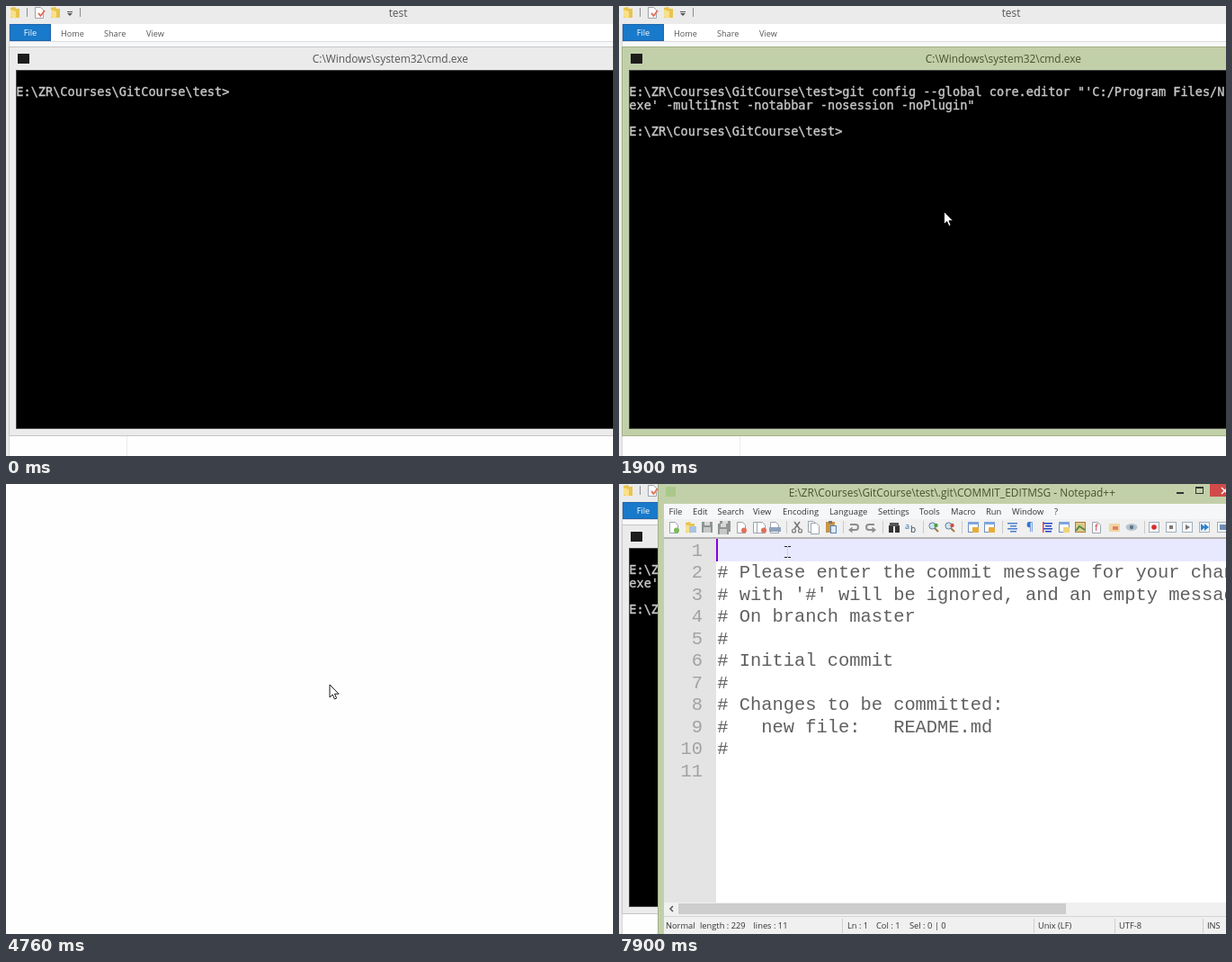
Animation of 675x500 px, one loop 8000 ms. Source, as an HTML page with a canvas:

```html
<!DOCTYPE html>
<html lang="en">
<head>
<meta charset="utf-8">
<title>Commit from the console</title>
<style>
html, body { margin: 0; width: 100%; height: 100%; overflow: hidden; background: #fff; }
canvas { display: block; width: 675px; height: 500px; }
</style>
</head>
<body>
<canvas id="stage" width="675" height="500"></canvas>
<script>
const ctx = document.getElementById('stage').getContext('2d');
const LOOP = 8000;
const UI = '"Open Sans", "Noto Sans", sans-serif';
const CONSOLE = '"DejaVu Sans Mono", monospace';
const CODE = '"Liberation Mono", monospace';
const GREEN = '#c2d0a9', GREY = '#ebebeb', INK = '#c6c6c6';
const PROMPT = 'E:\\ZR\\Courses\\GitCourse\\test>';
const CELL = 8.18;
const TITLE = 11.88;

function rect(x, y, w, h, fill) {
  ctx.fillStyle = fill;
  ctx.fillRect(x, y, w, h);
}

function frame(x, y, w, h, stroke) {
  ctx.strokeStyle = stroke;
  ctx.lineWidth = 1;
  ctx.strokeRect(x + .5, y + .5, w - 1, h - 1);
}

function text(str, x, y, size, fill, font = UI, align = 'left') {
  ctx.font = `${size}px ${font}`;
  ctx.textAlign = align;
  ctx.fillStyle = fill;
  ctx.fillText(str, x, y);
}

function poly(points, fill, stroke, width = 1) {
  ctx.beginPath();
  points.forEach(([x, y], i) => i ? ctx.lineTo(x, y) : ctx.moveTo(x, y));
  if (fill) { ctx.closePath(); ctx.fillStyle = fill; ctx.fill(); }
  if (stroke) { ctx.strokeStyle = stroke; ctx.lineWidth = width; ctx.stroke(); }
}

function arc(x, y, r, stroke, width, from = 0, to = 7) {
  ctx.beginPath();
  ctx.arc(x, y, r, from, to);
  ctx.strokeStyle = stroke;
  ctx.lineWidth = width;
  ctx.stroke();
}

function disc(x, y, r, fill) {
  ctx.beginPath();
  ctx.arc(x, y, r, 0, 7);
  ctx.fillStyle = fill;
  ctx.fill();
}

// Position along [time, x, y] stops, advanced in small hops like a screen capture
function along(stops, t, hop) {
  const first = stops[0][0], last = stops[stops.length - 1];
  const s = first + Math.floor((t - first) / hop + .01) * hop;
  if (t >= last[0]) return [last[1], last[2]];
  if (s <= first) return [stops[0][1], stops[0][2]];
  const i = stops.findIndex(k => k[0] > s);
  const [t0, x0, y0] = stops[i - 1], [t1, x1, y1] = stops[i];
  const u = (s - t0) / (t1 - t0), e = u * u * (3 - 2 * u);
  return [Math.round(x0 + (x1 - x0) * e), Math.round(y0 + (y1 - y0) * e)];
}

// ---- small icons ----

function doc(x, y, accent) {
  poly([[x + 1.5, y + .5], [x + 7.5, y + .5], [x + 10.5, y + 3.5], [x + 10.5, y + 12.5], [x + 1.5, y + 12.5], [x + 1.5, y + .5]], '#fff', '#9aa3ad');
  if (accent) disc(x + 9, y + 9.5, 3, accent);
}

function folder(x, y) {
  poly([[x, y + 1], [x + 5, y], [x + 6, y + 2], [x + 10, y + 2], [x + 10, y + 12], [x, y + 12]], '#e9c44d');
  poly([[x, y + 3], [x + 6, y + 5], [x + 6, y + 13], [x, y + 11]], '#f8e08c');
}

function disk(x, y) {
  rect(x, y, 12, 12, '#8f9494');
  rect(x + 3, y, 6, 4, '#d8d8d8');
  rect(x + 2, y + 6, 8, 6, '#c8c8c8');
}

function lens(x, y, mark) {
  poly([[x + 7, y + 7], [x + 11, y + 11]], null, '#a07a40', 2);
  disc(x + 4.5, y + 4.5, 3.6, '#cfe3f2');
  arc(x + 4.5, y + 4.5, 3.6, '#5d7f9c', 1);
  disc(x + 8.5, y + 4, 2.2, mark);
}

function hook(x, y, dir) {
  ctx.save();
  ctx.translate(x + 6, y + 6);
  ctx.scale(dir, 1);
  poly([[-4, -3], [2, -3]], null, '#8d8d8d', 2);
  arc(2, 0, 3, '#8d8d8d', 2, -Math.PI / 2, Math.PI / 2);
  poly([[2, 3], [-2, 3]], null, '#8d8d8d', 2);
  poly([[-6, 3], [-1.5, -.5], [-1.5, 6.5]], '#8d8d8d');
  ctx.restore();
}

function panel(x, y, mark) {
  rect(x, y, 12, 12, '#fff');
  frame(x, y, 12, 12, '#6d8fc0');
  rect(x, y, 12, 3, '#7fa5dc');
  rect(x + 5, y + 6, 7, 6, mark);
}

function lines(x, y, color) {
  for (let i = 0; i < 4; i++) rect(x + (i % 2) * 3, y + 1 + i * 3, 11 - (i % 2) * 4, 1.5, color);
}

function button(x, y) {
  rect(x, y, 12, 12, '#f8f8f8');
  frame(x, y, 12, 12, '#9fb0c0');
}

// ---- pointers ----

function arrow(x, y) {
  poly([[0, 0], [0, 14], [3.2, 11], [5.4, 16], [7.6, 15], [5.5, 10.2], [10, 10.2], [0, 0]].map(([a, b]) => [x + a, y + b]), '#fff', '#000', .9);
}

function beam(x, y) {
  [y - 7, y + 5].forEach(v => {
    rect(x - 3, v, 3, 1, '#222');
    rect(x + 1, v, 3, 1, '#222');
  });
  for (let i = -6; i < 5; i += 2) rect(x, y + i, 1, 1, '#bbb');
}

function busy(x, y) {
  arc(x, y, 6.8, '#2a8df0', 4);
  arc(x, y, 6.8, '#4fb0ff', 2.6, 2.6, 5);
}

// ---- explorer and console ----

function explorer() {
  rect(0, 0, 675, 500, GREY);
  folder(5, 1);
  rect(23, 2, 1, 10, '#8c8c8c');
  doc(31, 1);
  poly([[36, 8], [38.5, 11], [43, 5]], null, '#e0785f', 2);
  folder(50, 1);
  rect(68, 6, 6, 1, '#555');
  poly([[68, 8], [74, 8], [71, 11]], '#555');
  rect(82, 2, 1, 10, '#8c8c8c');
  text('test', 436, 11.5, TITLE, '#555', UI, 'center');

  rect(4, 20, 671, 19, '#fff');
  rect(4, 39, 671, 1, '#dcdddf');
  rect(4, 40, 671, 5, '#f7f8f9');
  rect(4, 20, 46, 19, '#1979ca');
  frame(4, 20, 46, 19, '#2265ad');
  text('File', 27, 33, 9.2, '#fff', UI, 'center');
  [['Home', 61], ['Share', 109], ['View', 156]].forEach(([s, x]) => text(s, x, 33.5, 9.1, '#555'));

  rect(3, 20, 1, 480, '#d5d5d5');
  rect(4, 478, 671, 22, '#fefefe');
  rect(134, 478, 1, 22, '#ececec');
}

function consoleWindow(t) {
  const active = t >= 580 && t < 4700;
  rect(3, 45, 680, 433, active ? GREEN : GREY);
  frame(3, 45, 680, 433, active ? '#a4b184' : '#c6c6c6');
  rect(13, 53, 13, 11, '#1c1c1c');
  const title = 'C:\\Windows\\system32\\cmd.exe' + (t >= 4550 ? ' - git  commit' : '');
  text(title, 427.3, 63, TITLE, active ? '#46522f' : '#555', UI, 'center');
  rect(11, 71, 670, 399, '#444');
  rect(12, 72, 670, 397, '#000');

  // A hairline outline gives the sturdier strokes of the console face
  const put = (s, y) => {
    text(s, 11.3, y, CELL / .602, INK, CONSOLE);
    ctx.strokeStyle = INK;
    ctx.lineWidth = .4;
    ctx.strokeText(s, 11.3, y);
  };
  const cursor = (col, y) => rect(11.3 + col * CELL, y, 8.5, 4, INK);
  if (t < 1450) {
    put(PROMPT, 100);
    if (t >= 1090) cursor(29, 98);
    return;
  }
  put(PROMPT + 'git config --global core.editor "\'C:/Program Files/N', 100);
  put('exe\' -multiInst -notabbar -nosession -noPlugin"', 114.5);
  if (t < 1600) return;
  const keys = [3220, 3320, 3410, 3500, 3720, 3790, 3860, 4090, 4200, 4310];
  const typed = 'git commit'.slice(0, keys.filter(k => t >= k).length);
  put(PROMPT + typed, 144);
  if ((t >= 2580 && t < 3130) || (t >= 3650 && t < 3720)) cursor(29 + typed.length, 142);
}

function menu(hot) {
  rect(351, 208, 136, 114, '#f0f0f0');
  frame(351, 208, 136, 114, '#979797');
  rect(376, 211, 1, 108, '#dcdcdc');
  if (hot >= 0) {
    rect(354, 247 + (hot - 2) * 18, 131, 18, '#d1e2f1');
    frame(354, 247 + (hot - 2) * 18, 131, 18, '#88b9e6');
  }
  ['Mark', 'Copy', 'Paste', 'Select All', 'Scroll', 'Find...'].forEach((s, i) =>
    text(s, 380.5, 223.5 + i * 18, 9.5, i === 1 ? '#8d8d8d' : '#222'));
  text('Enter', 447, 241.5, 9.5, '#8d8d8d');
}

// ---- editor ----

function toolbar() {
  const y = 42;
  rect(50, 39, 625, 20, '#f0f0f0');
  [186, 249, 293, 338, 381, 426, 584].forEach(x => rect(x, 41, 1, 14, '#c9c9c9'));
  doc(55, y, '#7dbb5a');
  folder(74, y);
  rect(78, y + 5, 8, 7, '#a9c4e0');
  disk(92, y);
  disk(112, y - 1);
  disk(110, y + 2);
  doc(130, y, '#e0705a');
  doc(148, y, '#e0705a');
  doc(152, y, '#e0705a');
  doc(167, y);
  rect(167, y + 6, 13, 5, '#8fa3bb');
  poly([[195, y], [201, y + 8]], null, '#777', 1.5);
  poly([[201, y], [195, y + 8]], null, '#777', 1.5);
  arc(194.5, y + 10, 2, '#777', 1.2);
  arc(201.5, y + 10, 2, '#777', 1.2);
  doc(209, y - 1);
  doc(212, y + 1);
  rect(230, y, 10, 12, '#c89547');
  rect(233, y - 1, 4, 3, '#777');
  rect(235, y + 4, 7, 9, '#dce9f8');
  frame(235, y + 4, 7, 9, '#5984bd');
  hook(255, y, 1);
  hook(274, y, -1);
  rect(300, y + 4, 5, 8, '#333');
  rect(307, y + 4, 5, 8, '#333');
  rect(301, y + 1, 10, 4, '#555');
  text('a', 318, y + 8, 9, '#2f6fc0');
  text('b', 324, y + 12, 10, '#345');
  lens(344, y, '#4f9f45');
  lens(362, y, '#cf4f42');
  panel(388, y, '#e5ad3b');
  panel(406, y, '#e5ad3b');
  lines(432, y, '#4d7fcb');
  text('¶', 453, y + 10, 12, '#3475d3');
  lines(471, y, '#2446c8');
  rect(471, y, 1.5, 12, '#d25050');
  panel(489, y, '#f1d377');
  rect(507, y, 12, 12, '#dcc98c');
  frame(507, y, 12, 12, '#b47c3a');
  poly([[508, y + 10], [512, y + 5], [518, y + 9]], null, '#4f8c48', 2);
  doc(525, y);
  text('f', 529, y + 10, 11, '#c63c35');
  rect(545, y + 2, 12, 9, '#f0d7a2');
  rect(549, y + 5, 6, 4, '#e48068');
  ctx.beginPath();
  ctx.ellipse(570, y + 6, 6.5, 4, 0, 0, 7);
  ctx.fillStyle = '#b5c4ce';
  ctx.fill();
  disc(570, y + 6, 2.2, '#5c7688');
  [589, 608, 626, 645, 665].forEach(x => button(x, y));
  disc(595, y + 6, 2.8, '#d92c2c');
  rect(612, y + 4, 4, 4, '#777');
  poly([[630, y + 3], [630, y + 9], [635, y + 6]], '#777');
  [647, 651].forEach(x => poly([[x, y + 2], [x, y + 10], [x + 5, y + 6]], '#2d82cf'));
  rect(668, y + 3, 7, 6, '#6f8cb2');
}

function editor(t) {
  rect(43, 0, 632, 500, GREEN);
  rect(43, 0, 1, 500, '#a4b184');
  rect(52, 3, 11, 11, '#a9c98a');
  text('E:\\ZR\\Courses\\GitCourse\\test\\.git\\COMMIT_EDITMSG - Notepad++', 370.3, 14.3, TITLE, '#46522f', UI, 'center');
  rect(620, 9, 8, 2, '#333');
  frame(641, 3, 9, 8, '#333');
  rect(641, 3, 9, 2, '#333');
  rect(657, 0, 18, 14, '#d04a4a');
  poly([[670, 4], [677, 11]], null, '#fff', 1.5);
  poly([[670, 11], [677, 4]], null, '#fff', 1.5);

  rect(50, 22, 625, 17, '#f6f7f8');
  [['File', 55.5], ['Edit', 82], ['Search', 109.5], ['View', 149], ['Encoding', 182], ['Language', 234],
   ['Settings', 288], ['Tools', 334], ['Macro', 369], ['Run', 408], ['Window', 437], ['?', 484]]
    .forEach(([s, x]) => text(s, x, 34.3, 9.4, '#333'));
  toolbar();

  rect(50, 59, 625, 2, '#b4b4b4');
  rect(50, 61, 58, 404, '#e4e4e4');
  rect(108, 61, 567, 404, '#fff');
  rect(108, 61, 567, 25, '#e8e8ff');
  const message = ['', '# Please enter the commit message for your changes.',
    "# with '#' will be ignored, and an empty message aborts", '# On branch master', '#',
    '# Initial commit', '#', '# Changes to be committed:', '#   new file:   README.md', '#', ''];
  message.forEach((s, i) => {
    const y = 79.5 + i * 24.5;
    text(i + 1, 93, y, 20.42, '#a2a2a2', CODE, 'right');
    text(s, 109.2, y, 20.42, '#606060', CODE);
  });
  if (t < 7090 || t >= 7620) rect(108, 61, 2, 25, '#8000e0');

  rect(50, 465, 625, 14, '#f0f0f0');
  rect(66, 466, 431, 12, '#cdcdcd');
  poly([[60, 469], [57, 472], [60, 475]], null, '#555', 1.5);
  rect(50, 479, 625, 21, '#f0f0f0');
  rect(50, 480, 625, 1, '#d4d4d4');
  [248, 461, 551, 649].forEach(x => rect(x, 483, 1, 16, '#cfcfcf'));
  [['Normal', 52], ['length : 229', 90], ['lines : 11', 149.5], ['Ln : 1', 254], ['Col : 1', 286],
   ['Sel : 0 | 0', 323], ['Unix (LF)', 466], ['UTF-8', 556], ['INS', 654]]
    .forEach(([s, x]) => text(s, x, 494, 9.3, '#333'));
}

// ---- scene ----

const toMenu = [[140, 662, 318], [580, 356, 212], [720, 351, 208], [870, 358, 216], [1160, 390.5, 255]];
const fromMenu = [[1300, 390, 255], [1450, 388, 254], [1900, 361.5, 228.5]];
const toText = [[7250, 344, 9], [7600, 214, 94], [7900, 187, 76]];

function draw(t) {
  if (t >= 4760 && t < 6780) {
    rect(0, 0, 675, 500, '#fefefe');
    if (t < 5530) arrow(360, 223);
    else if (t < 5620) arrow(367, 246);
    return;
  }
  explorer();
  consoleWindow(t);
  if (t >= 6780) {
    editor(t);
    const [x, y] = along(toText, t, 72);
    if (y < 58) arrow(x, y);
    else beam(x, y);
    return;
  }
  if (t >= 720 && t < 1450) menu(t < 950 ? -1 : t < 1020 ? 0 : t < 1090 ? 1 : 2);
  if (t >= 4700) busy(360, 227.7);
  else if (t >= 2350) arrow(360.5, 228.5);
  else if (t >= 1300) arrow(...along(fromMenu, t, 75));
  else if (t >= 140) arrow(...along(toMenu, t, 73));
}

const start = performance.now();
function tick() {
  draw((performance.now() - start) % LOOP);
  requestAnimationFrame(tick);
}
tick();
</script>
</body>
</html>
```
